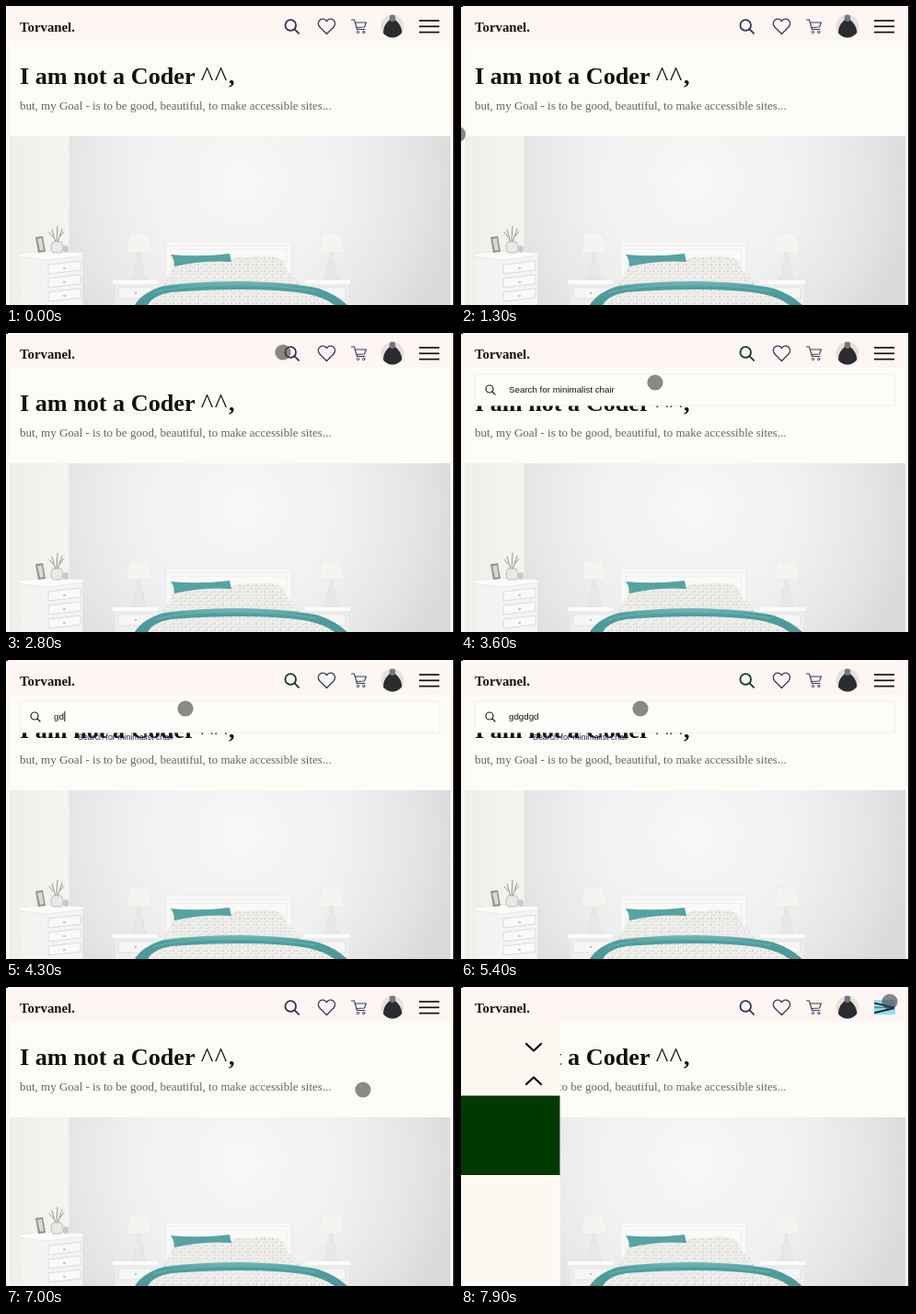
An HTML page for the animation above (8000 ms loop, 488 px wide and 326 px high).

```html
<!DOCTYPE html>
<html lang="en">
<head>
<meta charset="utf-8">
<title>Bedroom shop page</title>
<style>
  html, body { margin: 0; width: 100%; height: 100%; overflow: hidden; background: #fdf6f2; }
  svg { display: block; width: 488px; height: 326px; }
  .serif { font-family: "Liberation Serif", "Times New Roman", serif; }
  .sans { font-family: "Liberation Sans", Arial, sans-serif; font-size: 9.75px; }
  .line { fill: none; stroke-linecap: round; stroke-linejoin: round; }
</style>
</head>
<body>
<svg viewBox="0 0 488 326" xmlns="http://www.w3.org/2000/svg">
  <defs>
    <radialGradient id="wall" gradientUnits="userSpaceOnUse" cx="255" cy="190" r="245">
      <stop offset="0" stop-color="#f8f8f8"/>
      <stop offset=".5" stop-color="#f0f0f2"/>
      <stop offset=".75" stop-color="#e6e6e8"/>
      <stop offset="1" stop-color="#d9d9da"/>
    </radialGradient>
    <linearGradient id="side">
      <stop offset="0" stop-color="#eeeeea"/>
      <stop offset="1" stop-color="#f4f4f1"/>
    </linearGradient>
    <linearGradient id="throw" x2="0" y2="1">
      <stop offset="0" stop-color="#7dbcba"/>
      <stop offset=".25" stop-color="#4f9f9f"/>
      <stop offset="1" stop-color="#4a9898"/>
    </linearGradient>
    <pattern id="print" width="9" height="7" patternUnits="userSpaceOnUse">
      <rect width="9" height="7" fill="#efeeea"/>
      <circle cx="2" cy="2" r=".9" fill="#bcd3d3"/>
      <circle cx="5" cy="5" r=".8" fill="#d9d0b4"/>
      <circle cx="7.500" cy="2.500" r=".7" fill="#c4c8d2"/>
      <circle cx="2" cy="5.800" r=".6" fill="#d2c4c1"/>
    </pattern>
    <clipPath id="round"><circle cx="420" cy="22" r="12.5"/></clipPath>
    <g id="stand">
      <path d="M116 299h49v5h-49z" fill="#fbfbfa"/>
      <path d="M119 304h44v22h-44z" fill="#efefed"/>
      <path d="M122 307h38v12h-38zM116 304h49" fill="#f6f6f5" stroke="#d8d8d6" stroke-width=".7"/>
      <circle cx="141" cy="313" r="1" fill="#aaa"/>
      <path d="M134 248h21l4 21h-28z" fill="#f5f4f0" stroke="#e6e5e1" stroke-width=".6"/>
      <path d="M143 269h3v8q6 8 2 18h4v3h-15v-3h4q-4-10 2-18z" fill="#e8e8e6" stroke="#dcdcda" stroke-width=".6"/>
    </g>
  </defs>

  <rect width="488" height="326" fill="#fdf6f2"/>
  <rect x="4" y="38" width="479" height="288" fill="#fefcf7"/>

  <g class="serif">
    <text x="15" y="85" font-size="26.2" font-weight="bold" fill="#111">I am not a Coder <tspan dy="2" font-size="29" font-weight="normal" letter-spacing="1.5">^^</tspan><tspan dy="-2">,</tspan></text>
    <text x="15" y="113" font-size="13" fill="#666">but, my Goal - is to be good, beautiful, to make accessible sites...</text>
  </g>

  <g id="room">
    <rect x="4" y="142" width="479" height="184" fill="url(#wall)"/>
    <rect x="4" y="142" width="65" height="184" fill="url(#side)"/>
    <path d="M69 142v128" stroke="#e2e2e0" stroke-width=".8"/>
    <!-- dresser -->
    <path d="M15 273l28 4v49h-25z" fill="#f3f3f1"/>
    <path d="M43 277l40-5v54h-40z" fill="#f4f4f2"/>
    <path d="M14 270l29-3 41 2v3l-41 5-29-4z" fill="#fcfcfb" stroke="#dededb" stroke-width=".6"/>
    <path d="M46 282l35-4v10l-35 4zM46 297l35-4v10l-35 4zM46 312l35-4v10l-35 4z" fill="#f9f9f8" stroke="#d4d4d1" stroke-width=".8"/>
    <path d="M62 286h3m-3 15h3m-3 15h3" stroke="#999"/>
    <path d="M32 252l8-1 3 17-8 1z" fill="#8e9290"/>
    <path d="M34 254l5-1 2 13-4 1z" fill="#d8d8d5"/>
    <path class="line" d="M54 258l-4-14m5 14l1-18m0 18l5-15m-10 9l-4-5m12 4l4-5" stroke="#8c8d86" stroke-width=".9"/>
    <path d="M51 257h9q4 6 0 12h-9q-4-6 0-12z" fill="#e9e9e7" stroke="#aaa" stroke-width=".7"/>
    <ellipse cx="65" cy="265" rx="3" ry="4" fill="#c9c9c5"/>
    <!-- bed -->
    <path d="M174 257h136v51h-136z" fill="#fafaf9" stroke="#e6e6e4" stroke-width=".7"/>
    <path d="M174 261h136M179 265h126v30h-126z" fill="none" stroke="#ececea"/>
    <use href="#stand"/>
    <use href="#stand" x="209"/>
    <path d="M182 280q32-7 64-3l-1 16h-66z" fill="url(#print)"/>
    <path d="M242 279q6-7 20-5 28-5 40 4l5 14h-65z" fill="url(#print)"/>
    <path d="M179 271q32 3 64-1l2 9q-30-2-62 5 0-8-4-13z" fill="#56a3a2"/>
    <path d="M178 290q65-9 131 0l14 16 20 20H155l14-20z" fill="url(#print)"/>
    <path d="M140 326q8-14 32-21 38-5 82-5 56 1 86 8 18 6 31 18z" fill="url(#throw)"/>
    <path d="M154 326q6-11 26-14 38-3 74-3 46 0 74 5 19 4 29 12z" fill="url(#print)"/>
    <path class="line" d="M160 313q20-8 94-9 50 1 82 7" stroke="#79b9b7" stroke-width=".8"/>
  </g>

  <g id="search">
    <rect x="15" y="45" width="456.5" height="34" fill="#fefdfa" stroke="#f4f0ea"/>
    <g class="line" stroke="#222" stroke-width="1.2"><circle cx="31" cy="61" r="4"/><path d="M34 64l3 3"/></g>
    <text id="hint" class="sans">Search for minimalist chair</text>
    <text id="typed" class="sans" x="52" y="65" fill="#111"></text>
    <rect id="caret" y="56" width="1" height="11" fill="#111"/>
  </g>

  <g id="menu">
    <rect y="38" width="108" height="288" fill="#fdf9f2"/>
    <rect y="118.5" width="107.5" height="86.5" fill="#003a00"/>
    <path class="line" d="M71 62l8 7.500 8-7.500M71 106l8-7.500 8 7.500" stroke="#111" stroke-width="2.3"/>
  </g>

  <g id="header">
    <rect width="488" height="38" fill="#fdf6f2"/>
    <text class="serif" x="15" y="28" font-size="14.8" font-weight="bold" fill="#111">Torvanel.</text>
    <g id="lens" class="line" stroke-width="1.8"><circle cx="309.300" cy="21" r="5.800"/><path d="M313.700 25.400l4.500 4.500"/></g>
    <g class="line" stroke="#353b60">
      <path d="M348.500 30.500l-7.500-7.500c-5-6 3-12.500 7.500-6.500 4.500-6 12.500.5 7.500 6.500z" stroke-width="1.4"/>
      <path d="M375.500 15h3l3 10.500h8.500M379.500 18h12l-2 5-8.500.5" stroke-width="1.1"/>
      <circle cx="382.500" cy="28.500" r="1.200"/><circle cx="388.700" cy="28.500" r="1.200"/>
    </g>
    <g clip-path="url(#round)">
      <rect x="407" y="9" width="26" height="26" fill="#e6e1de"/>
      <path d="M411 36q-3-12 4-19l2-2h6l3 3q6 7 4 18z" fill="#2a2c2f"/>
      <ellipse cx="420" cy="13" rx="3.300" ry="4" fill="#77787a"/>
    </g>
    <rect id="glow" x="449" y="14" width="23" height="16" fill="#8fdcf5"/>
    <g id="burger" stroke="#111" stroke-width="1.7"><path d="M449 16h22"/><path d="M449 22.300h22"/><path d="M449 28.600h22"/></g>
  </g>

  <rect x="486" width="2" height="326" fill="#111"/>
  <rect id="corner" width="2" height="1" fill="#111"/>
  <circle id="cursor" r="8.600" fill="#3c3c3c" fill-opacity=".6"/>
</svg>
<script>
  const LOOP = 8000, STEP = 100;
  const $ = id => document.getElementById(id);
  const set = (el, attrs) => { for (const k in attrs) el.setAttribute(k, attrs[k]); };
  const show = (id, on) => set($(id), { visibility: on ? "visible" : "hidden" });
  const clamp = v => Math.min(1, Math.max(0, v));
  const ease = v => v * v * (3 - 2 * v);
  const ramp = (t, from, to) => ease(clamp((t - from) / (to - from)));
  const mix = (a, b, p) => a + (b - a) * p;

  // time, x, y
  const path = [
    [0, -20, 144], [1200, -20, 144], [2100, 460, 26], [2800, 301, 21], [3000, 311, 22],
    [3100, 311, 22], [3600, 211, 54], [3900, 195, 53], [6200, 195, 53],
    [7000, 388, 112], [7100, 430, 46], [7600, 466, 16], [LOOP, 466, 16]
  ];
  const keys = [4200, 4300, 4400, 4500, 4700, 4700];

  function cursorAt(t) {
    const i = path.findIndex(p => p[0] > t);
    const [t0, x0, y0] = path[i - 1], [t1, x1, y1] = path[i];
    const p = ramp(t, t0, t1);
    return { cx: mix(x0, x1, p), cy: mix(y0, y1, p) };
  }

  function draw(t) {
    set($("cursor"), cursorAt(t));
    show("corner", t >= 100);

    const open = ramp(t, 3000, 3400) - ramp(t, 6400, 6800);
    set($("search"), { transform: `translate(0 ${-42 * (1 - open)})` });
    show("search", open > 0);
    set($("lens"), { stroke: t >= 3100 && t < 6600 ? "#0d3b1c" : "#2b3157" });

    const float = ramp(t, 3900, 4200);
    set($("hint"), {
      x: mix(52, 78, float), y: mix(65, 87, float),
      style: `font-size:${mix(9.75, 8.83, float)}px`, fill: float > .5 ? "#1d2350" : "#111"
    });
    const count = keys.filter(k => t >= k).length;
    $("typed").textContent = "gdgdgd".slice(0, count);
    const caretOn = (t >= 4000 && t < 4700) || (t >= 4900 && t < 5400) || (t >= 5900 && t < 6300);
    set($("caret"), { x: 52.5 + count * 5.42, opacity: caretOn ? 1 : 0 });

    const menu = t >= 7900;
    show("menu", menu);
    show("glow", menu);
    const [top, mid, bottom] = $("burger").children;
    set(top, { transform: menu ? "translate(0 4) rotate(13 460 16)" : "" });
    set(mid, { opacity: menu ? .45 : 1 });
    set(bottom, { transform: menu ? "translate(0 -3) rotate(-13 460 28.6)" : "" });
  }

  function tick() {
    draw(Math.floor(performance.now() % LOOP / STEP) * STEP);
    requestAnimationFrame(tick);
  }
  tick();
</script>
</body>
</html>
```
